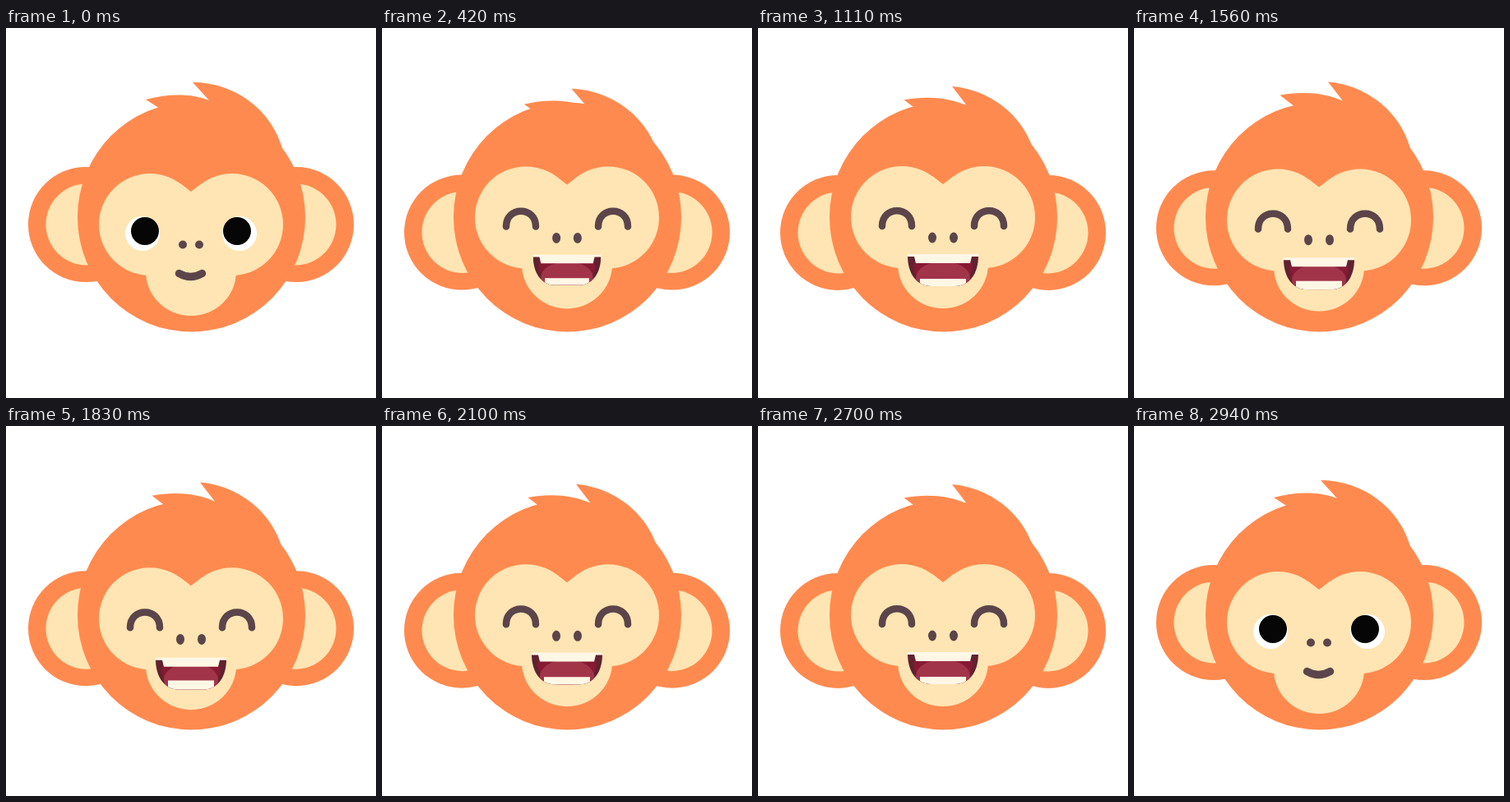
Recreate the animation shown at these times as an HTML page. Size 450 by 450 pixels, loop 3.3 s.

```html
<!DOCTYPE html>
<html lang="en">
<head>
<meta charset="utf-8">
<title>Laughing monkey</title>
<style>
html, body { margin: 0; width: 100%; height: 100%; overflow: hidden; background: #fff; }
svg { display: block; width: 100vw; height: 100vh; }
.fur { fill: #ff8a4f; }
.skin { fill: #ffe5b3; }
.dark { fill: #5b454a; }
.line { fill: none; stroke: #5b454a; stroke-linecap: round; }
.teeth { fill: #fff7e6; }
</style>
</head>
<body>
<svg viewBox="0 0 450 450">
  <defs>
    <clipPath id="lips">
      <path d="M182 277H268C268 299 257 314 239 314H211C193 314 182 299 182 277Z"/>
    </clipPath>
  </defs>

  <g id="ears">
    <circle class="fur" cx="97" cy="239" r="70"/>
    <circle class="fur" cx="353" cy="239" r="70"/>
    <circle class="skin" cx="98" cy="239" r="49.5"/>
    <circle class="skin" cx="352" cy="239" r="49.5"/>
  </g>
  <ellipse class="fur" cx="225.5" cy="230" rx="138.5" ry="139.5"/>
  <path id="hair" class="fur" d="M170 87C195 80 224 79 247 88L227 66C276 66 324 98 337 150L320 180L215 116Z"/>

  <g id="face">
    <g class="skin">
      <circle cx="175" cy="239" r="62"/>
      <circle cx="275" cy="239" r="62"/>
      <path d="M212 189L225 199L238 189V260H212Z"/>
      <ellipse cx="225" cy="296" rx="55" ry="54"/>
    </g>
    <g id="open">
      <circle cx="166" cy="250" r="21" fill="#fff"/>
      <circle cx="284" cy="250" r="21" fill="#fff"/>
      <circle cx="169" cy="247" r="17" fill="#060606"/>
      <circle cx="281" cy="247" r="17" fill="#060606"/>
    </g>
    <path id="shut" class="line" stroke-width="8.5"
      d="M151 250C151 225 187 225 187 250M263 250C263 225 299 225 299 250"/>
  </g>

  <g id="nose">
    <ellipse class="dark" cx="215" cy="263.5"/>
    <ellipse class="dark" cx="235" cy="263.5"/>
  </g>
  <path id="smile" class="line" stroke-width="9.5" d="M210.500 298.500Q224.500 306.500 238.500 298.500"/>
  <g id="laugh">
    <g clip-path="url(#lips)">
      <rect x="180" y="275" width="90" height="42" fill="#5f2230"/>
      <ellipse cx="225" cy="290" rx="36" ry="25" fill="#861a33"/>
      <g id="jaw">
        <ellipse cx="225" cy="304" rx="33" ry="20" fill="#a2344a"/>
        <rect class="teeth" x="197" y="305" width="56" height="12"/>
      </g>
    </g>
    <path class="teeth" d="M182 275H268V278H260L258 286H192L190 278H182Z"/>
  </g>
</svg>
<script>
const LOOP = 3300, START = 487, STOP = 2713, REST = 2940, BEAT = (STOP - START) / 7;
const el = id => document.getElementById(id);
const [ears, hair, face, open, shut, nose, smile, laugh, jaw] =
  ['ears', 'hair', 'face', 'open', 'shut', 'nose', 'smile', 'laugh', 'jaw'].map(el);
const nostrils = [...nose.children];

const clamp = x => Math.min(1, Math.max(0, x));
const ease = x => (1 - Math.cos(Math.PI * clamp(x))) / 2;
const bump = (p, from, to) => Math.sin(Math.PI * clamp((p - from) / (to - from))) ** 2;
const move = (node, y) => node.setAttribute('transform', `translate(0 ${y})`);
const show = (node, on) => node.setAttribute('visibility', on ? 'visible' : 'hidden');
const squash = (node, x, y, sx, sy, dy = 0) => node.setAttribute('transform',
  `translate(${x} ${y + dy}) scale(${sx} ${sy}) translate(${-x} ${-y})`);

function draw(t) {
  // joy: 0 is the calm face, 1 the laughing one
  const joy = t < STOP ? ease(t / START) : 1 - ease((t - STOP) / (REST - STOP));
  const bouncing = t > START && t < STOP;
  const p = bouncing ? ((t - START) / BEAT) % 1 : 0;

  const drop = 10 * joy - 6.6 * bump(p, 0, 1);
  const tilt = 4.7 * clamp(t / 1100) * (t < STOP ? 1 : joy);
  const faceY = -9 * joy + 5 * bump(p, .05, .53);
  const chew = 7.5 * bump(p, .04, .5);

  move(ears, drop);
  hair.setAttribute('transform', `translate(0 ${drop}) rotate(${tilt} 290 174)`);
  move(face, faceY);

  const happy = joy > .5;
  show(open, !happy);
  show(shut, happy);
  squash(open, 225, 248, 1, Math.max(.12, 1 - 1.76 * joy));
  squash(shut, 225, 250, 1, clamp(joy * 2 - .8));

  move(nose, -8.5 * joy + .65 * chew);
  nostrils.forEach((n, i) => {
    n.setAttribute('cx', 225 + (i ? 1 : -1) * (10 + 3 * joy));
    n.setAttribute('rx', 5);
    n.setAttribute('ry', 5 + 1.5 * joy);
  });

  const gape = clamp((joy - .3) / .7);
  show(smile, gape === 0);
  move(smile, -9 * joy);
  show(laugh, gape > 0);
  squash(laugh, 225, 290, .36 + .64 * gape, .2 + .8 * gape, chew);
  move(jaw, -.35 * chew);
}

const begin = performance.now();
function tick() {
  draw((performance.now() - begin) % LOOP);
  requestAnimationFrame(tick);
}
draw(0);
requestAnimationFrame(tick);
</script>
</body>
</html>
```
